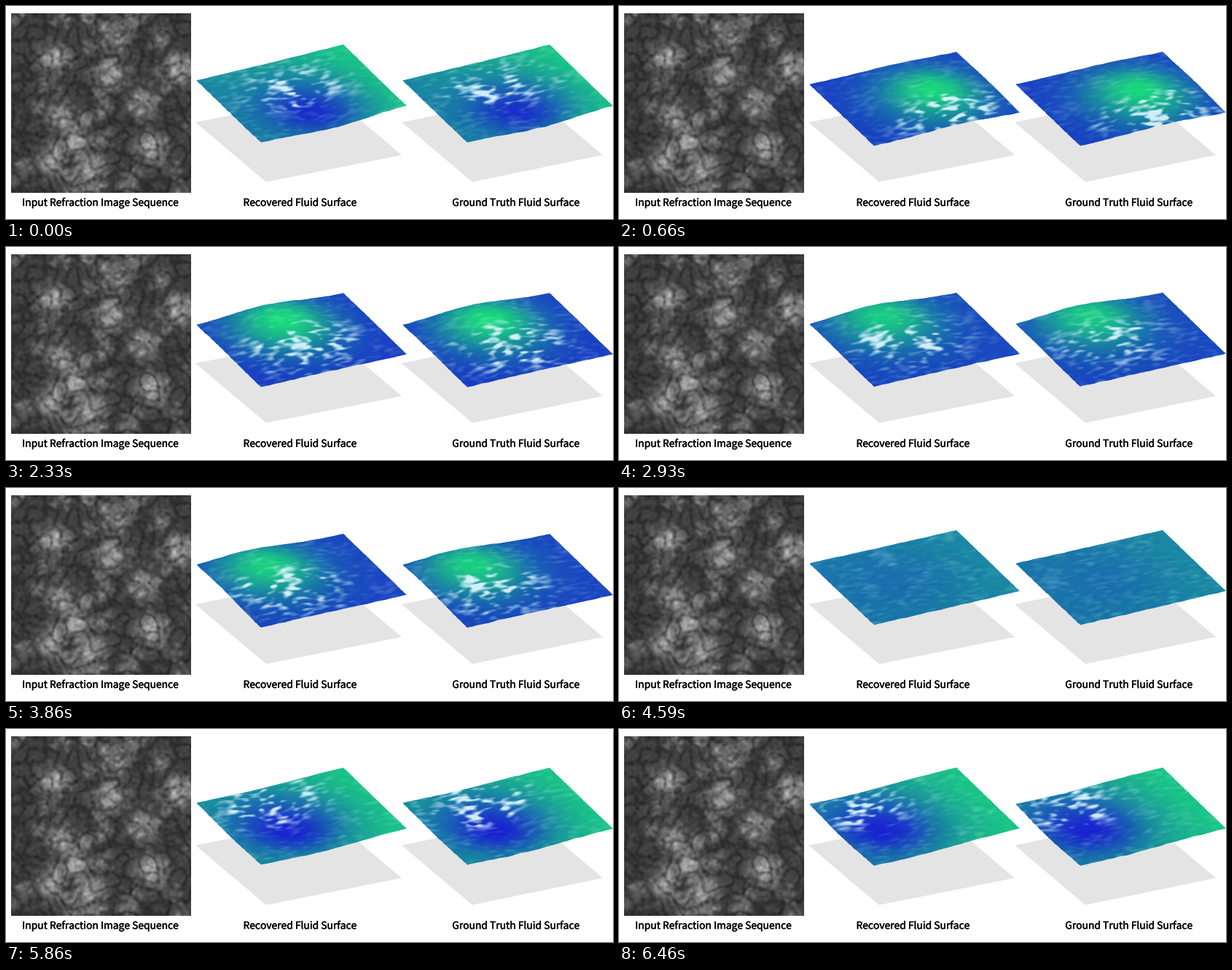
Write a matplotlib script that moves like this. It is 833x293 px and loops after 6590 ms.

```python
from functools import lru_cache
import numpy as np
import matplotlib.pyplot as plt
from matplotlib.animation import FuncAnimation
from matplotlib.patches import Polygon
from matplotlib.patheffects import withStroke

W, H, TICK = 833, 293, 10
HOLDS = [130] + [130, 70] * 16 + [130] + [130, 70] * 15 + [130]
STARTS = np.cumsum([0] + HOLDS[:-1])
LOOP = sum(HOLDS)

# One swell drifts over the pool: time, height, centre (u, v), tilt to the back.
SWELL = np.array([
    (0, -0.55, 0.70, 0.50, 0.30),
    (660, 0.70, 0.55, 0.60, 0.00),
    (1730, 0.85, 0.38, 0.50, 0.00),
    (2930, 0.62, 0.20, 0.42, 0.00),
    (3860, 0.65, 0.30, 0.35, 0.00),
    (5260, -0.70, 0.60, 0.50, 0.15),
    (6460, -0.55, 0.50, 0.30, 0.30),
])

# Main bright clouds of the input picture.
CLOUDS = [(148, 40), (65, 72), (141, 93), (190, 135), (200, 195),
          (113, 222), (60, 210), (95, 183), (238, 85), (72, 150)]

SHIFT = 283                      # distance between the two surfaces
X0, Y0, PW, PH = 256, 45, 294, 170
NU, NV, SS, SIDE = 300, 560, 2, 247
LOW, HIGH = np.array([5, 12, 208.]), np.array([5, 225, 108.])
GLOW = np.array([215, 244, 255.])
ALPHA, LIFT = 0.92, 17


def spectrum(ny, nx, ky, kx, seed, band=0.5):
    """Random band of waves with about ky, kx cycles across the field."""
    rng = np.random.default_rng(seed)
    f = np.hypot(np.fft.fftfreq(ny, 1 / ny)[:, None] / ky,
                 np.fft.rfftfreq(nx, 1 / nx) / kx)
    amp = np.exp(-(np.log(np.maximum(f, 1e-6)) / band) ** 2)
    return amp * np.exp(2j * np.pi * rng.random(f.shape)), f


def noise(wave, shape, t=0):
    spec, f = wave
    n = np.fft.irfft2(spec * np.exp(3j * f * t / 1000), shape)
    return n / n.std()


def swell_at(t):
    times = SWELL[:, 0]
    i = min(np.searchsorted(times, t, "right") - 1, len(times) - 2)
    f = (t - times[i]) / (times[i + 1] - times[i])
    f = f * f * (3 - 2 * f)
    return (1 - f) * SWELL[i, 1:] + f * SWELL[i + 1, 1:]


def heights(u, v, t):
    """Height field; the rim moves against the swell."""
    a, cu, cv, tilt = swell_at(t)
    bump = np.exp(-((u - cu) / 0.42) ** 2 - ((v - cv) / 0.32) ** 2)
    return 0.45 - 0.38 * a + a * bump + tilt * (v - 0.5)


U = np.linspace(0, 1, NU)[:, None]
V = np.linspace(1, 0, NV)[None]
BASE_X = 262 + 88 * U + 201 * V - 2 * U * V
BASE_Y = 102.5 + 84 * U - 44 * V - U * V


def surface(seed, t):
    shape = NU, NV
    ripple = noise(spectrum(NU, NV, 11, 7, seed, 0.65), shape, t)
    patch = noise(spectrum(NU, NV, 2.5, 3, seed + 1), shape, t)
    smooth = heights(U, V, t)

    # Slopes that face the viewer catch the light, broken up by ripples.
    facing = np.clip(-np.gradient(smooth, axis=0) * NU / 1.3, 0.08, 1)
    shine = np.clip(facing * (0.05 + 0.55 * ripple + 0.45 * patch), 0, 0.95)[..., None]

    h = smooth + 0.01 * ripple
    ix = np.clip(SS * (BASE_X - X0), 0, PW * SS - 1).astype(int)
    iy = np.clip(SS * (BASE_Y - LIFT * (h - 0.5) - Y0), 0, PH * SS - 2).astype(int)
    rgba = np.ones((NU, NV, 4), np.float32)
    rgb = LOW + (HIGH - LOW) * np.clip(1.1 * h - 0.03, 0, 1)[..., None]
    rgba[..., :3] = rgb + (GLOW - rgb) * shine

    # Back-to-front splats; the first pass fills gaps left by the second.
    buf = np.zeros((PH * SS, PW * SS, 4), np.float32)
    buf[iy + 1, ix] = rgba
    buf[iy, ix] = rgba
    out = buf.reshape(PH, SS, PW, SS, 4).sum((1, 3))
    out[..., :3] /= np.maximum(out[..., 3:], 1)
    out[..., 3] *= 255 * ALPHA / SS ** 2
    return out.astype(np.uint8)


def cloud_texture(n=512, margin=8):
    rng = np.random.default_rng(5)
    x = 7 + (np.arange(n) - margin) / 2
    y = x[:, None] + 3
    layer = lambda k, seed: noise(spectrum(n, n, k, k, seed), (n, n))
    wx, wy = x + 2.5 * layer(12, 7), y + 2.5 * layer(12, 8)
    small = [(*rng.uniform(7, 257, 2), rng.uniform(9, 15), 0.6) for _ in range(45)]
    blob = np.zeros((n, n))
    for cx, cy, r, light in small + [(*c, 22, 1) for c in CLOUDS]:
        d = np.hypot(wx - cx, wy - cy) / r
        blob = np.maximum(blob, light * np.exp(-d ** 2.4))
    grain = 0.66 + 0.32 * np.minimum(abs(layer(7, 1)), 1.4) + 0.08 * layer(24, 2)
    return np.clip(14 + 185 * (0.25 + 0.48 * blob) * grain, 14, 205).astype(np.uint8)


TEXTURE = cloud_texture()
gy, gx = np.mgrid[:SIDE, :SIDE]


def refracted(t):
    dy, dx = np.gradient(heights(gy / SIDE, gx / SIDE, t))
    at = lambda g, d: np.clip(2 * (g + 100 * d) + 8, 0, 511).astype(int)
    grey = TEXTURE[at(gy, dy), at(gx, dx)]
    return np.repeat(grey[..., None], 3, 2)


@lru_cache(maxsize=None)
def scene(k):
    t = STARTS[k]
    return refracted(t), surface(4, t), surface(9, t)


fig = plt.figure(figsize=(W / 100, H / 100), dpi=100, facecolor="white")
ax = fig.add_axes([0, 0, 1, 1])
ax.axis("off")


def place(pixels, x, y, z):
    h, w = pixels.shape[:2]
    return ax.imshow(pixels, extent=(x, x + w, y + h, y), aspect="auto",
                     interpolation="nearest", zorder=z)


for left, right in ((260, 543), (543, 819)):
    ax.add_patch(Polygon([(left, 160), (left + 97, 242), (right, 205), (right - 97, 123)],
                         color="#e4e4e4", lw=0, zorder=1))

corners = (7, 10), (X0, Y0), (X0 + SHIFT, Y0)
views = [place(pixels, x, y, z)
         for z, (pixels, (x, y)) in enumerate(zip(scene(0), corners), 2)]
ax.set_xlim(0, W)
ax.set_ylim(H, 0)

for x, label in ((129.5, "Input Refraction Image Sequence"),
                 (403.5, "Recovered Fluid Surface"),
                 (699.5, "Ground Truth Fluid Surface")):
    ax.text(x, 275, label, ha="center", va="baseline", fontsize=9.95,
            family="Noto Sans CJK JP", color="black", zorder=5,
            path_effects=[withStroke(linewidth=0.3, foreground="black")])


def update(tick):
    k = int(np.searchsorted(STARTS, tick * TICK, "right")) - 1
    for view, pixels in zip(views, scene(k)):
        view.set_data(pixels)
    return views


anim = FuncAnimation(fig, update, frames=LOOP // TICK, interval=TICK,
                     repeat=True, repeat_delay=0, blit=False)
plt.show()
```
